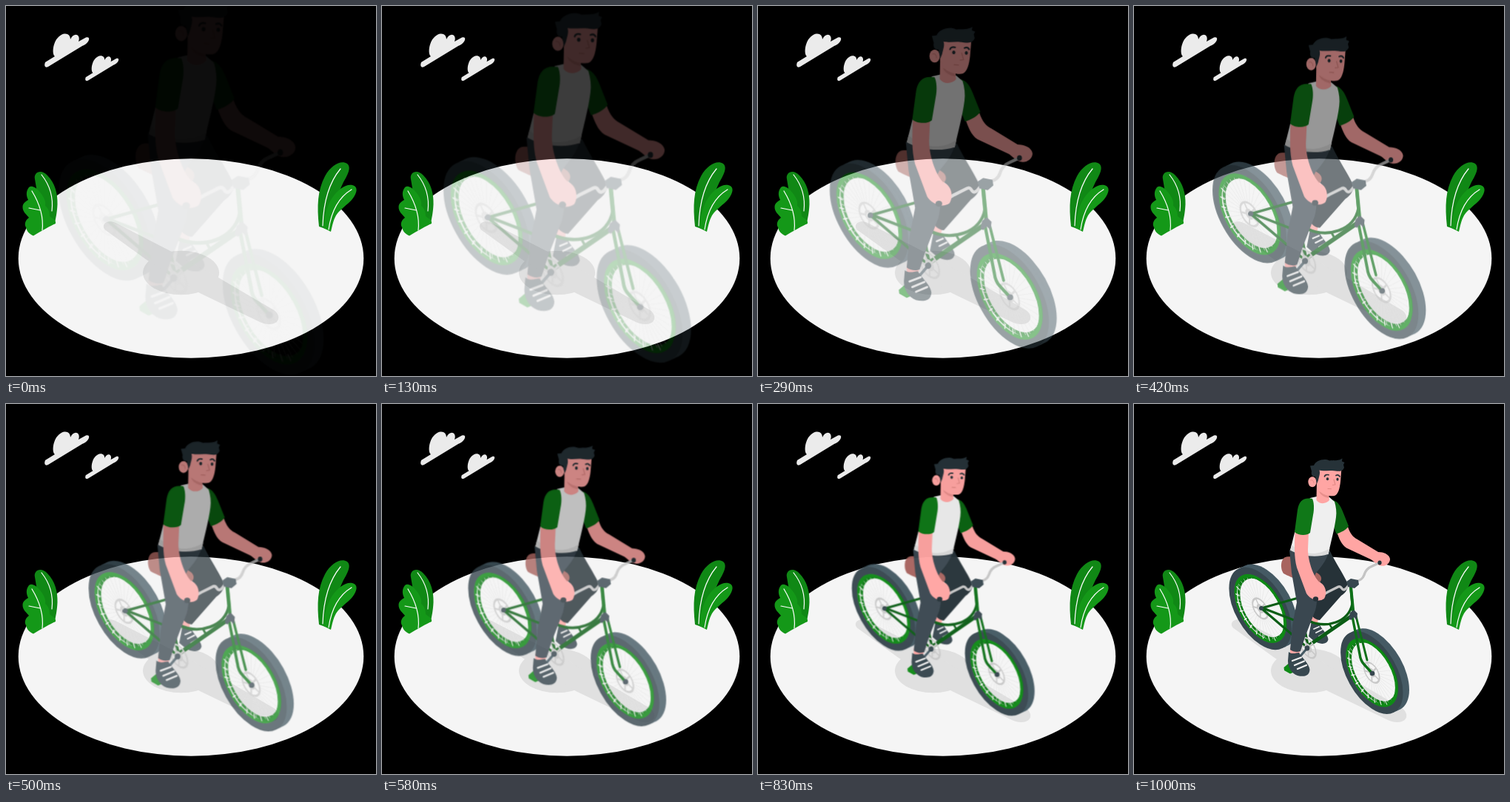
Animation, 500 px wide and 500 px high, one loop 1.04 s. Source, as an HTML page:

```html
<!DOCTYPE html>
<html lang="en">
<head>
<meta charset="utf-8">
<title>Cyclist</title>
<style>
  html, body { margin: 0; width: 100%; height: 100%; overflow: hidden; background: #000; }
  svg { display: block; width: 100vw; height: 100vh; }
  .line { fill: none; stroke-linecap: round; stroke-linejoin: round; }
  .skin { fill: #ffa5a3; }
  .slate { fill: #37474f; }
  .dark { fill: #263238; }
  .leaf { fill: #149818; }
  .leaf-back { fill: #108815; }
  .sleeve { fill: #107818; }
  .sleeve-far { fill: #0c6513; }
  .vein { stroke: #fff; stroke-width: 1.2; }
  .frame { stroke: #0b5d15; }
  .fork { stroke: #0e7018; }
  .metal { stroke: #c4c4c4; }
</style>
</head>
<body>
<svg viewBox="0 0 500 500">
  <defs>
    <path id="cloud" d="M53 76L66 68C63 66 63 58 65 52C68 42 75 38 79 37.5C84 37 87 40 87 45C90 38 96 37 98 41C99 43 99 45 98 48L108 42.5C113 41 113 45 111 48C109 51 106 53 103 54L57 82C53 84 51 81 53 76Z"/>
    <mask id="hole" maskUnits="userSpaceOnUse" x="-70" y="-80" width="150" height="150">
      <rect x="-70" y="-80" width="150" height="150" fill="#fff"/>
      <circle r="40"/>
    </mask>
    <!-- A flat disc seen in the isometric plane of the bike -->
    <g id="wheel" transform="matrix(.866 .56 0 1 0 0)">
      <g mask="url(#hole)" fill="#455a64">
        <circle cx="9.8" cy="-9.5" r="48.7"/>
        <circle cx="4.9" cy="-4.7" r="48.7"/>
      </g>
      <circle class="line" r="44.4" stroke="#37474f" stroke-width="8.600"/>
      <circle class="line" cx="3" cy="-2.600" r="36.400" stroke="#0c7a14" stroke-width="3.800"/>
      <circle class="line" r="38.500" stroke="#0f8a16" stroke-width="4"/>
      <path class="line spokes" stroke="#e4e4e4" stroke-width=".6"/>
      <path class="line ticks" stroke="#f5f5f5" stroke-width="1.300"/>
      <use href="#disc"/>
    </g>
    <g id="disc" class="line" stroke="#c8c8c8">
      <circle r="12" stroke-width="2.200"/>
      <circle r="4" stroke-width="3"/>
      <path class="arms" stroke-width="2"/>
    </g>
  </defs>

  <rect width="500" height="500"/>
  <ellipse cx="250" cy="341" rx="233.300" ry="134.700" fill="#f5f5f5"/>

  <g fill="#ebebeb">
    <use href="#cloud"/>
    <use href="#cloud" transform="translate(68 39.2) scale(.75)"/>
  </g>

  <g>
    <path class="leaf-back" d="M50 300L39 234C37 224 48 220 56 229C66 239 70 253 69.500 268C69 280 67 287 66 294Z"/>
    <path class="leaf" d="M37 310.500C31 308 28 304 27 299C24 294 27 289 31 286C28 282 22 278 22.500 271C23 266 27 264 30 262C27 256 27 250 31 245C36 241 43 248 47 253C51 258 54 264 53 270C58 274 59 279 59 284C63 288 68 289 67 294C60 297 48 304 37 310.500Z"/>
    <path class="line vein" d="M48 228C60 243 64 260 62 277M35 250C46 268 51 285 49 303M31 273L46 276"/>
    <path class="leaf-back" d="M423 298C420 270 421 249 431 230C440 214 453 208 461 213C467 218 462 228 456 238C447 256 442 278 437 303Z"/>
    <path class="leaf" d="M439 305L429 300C430 283 434 269 441 259C449 247 460 240 468 242C476 244 475 252 468 261C461 269 451 275 446 283C442 290 441 297 439 305Z"/>
    <path class="line vein" d="M452 220C437 238 429 265 428 297M467 248C452 257 440 275 436 302"/>
  </g>

  <g fill="#e0e0e0">
    <ellipse cx="236.500" cy="360.500" rx="51.500" ry="29.700"/>
    <path d="M148 293L222 331L287 367L362 411C372 418 370 430 356 430C351 430 347 429 343 427L262 388L190 343L136 304C126 297 136 287 148 293Z"/>
  </g>

  <g id="rider">
    <use href="#wheel" transform="translate(170.600 276.400)"/>

    <!-- Rear frame -->
    <g class="line frame" stroke-width="3">
      <path d="M172 276L222 262M172 276L234 329M172 275L216 292"/>
      <path d="M222 262L235 328" stroke-width="4"/>
    </g>

    <!-- Far leg and saddle -->
    <path class="skin" d="M239 286L249 290L248 296L238 295Z"/>
    <path class="slate" d="M240 293C244 296 248 297 250 296C252 303 262 311 262.500 318C261 326 250 325 243 320L236 314Z"/>
    <path class="line" d="M243 304L250 301M246 309L254 305M250 314L258 309.500" stroke="#f0f0f0" stroke-width="1.800"/>
    <path class="dark" d="M240 196L265 199C272 214 283 230 288 241C291 249 286 255 280 259L251 292C247 292 242 289 240 285L247 262L257 248L240 226Z"/>
    <path d="M206 206.500C198 208 197 222 202 229C213 235 238 245 247 243C254 241 255 234 250 230L218 208C214 206 210 206 206 206.500Z" fill="#a8645f"/>

    <!-- Front frame and wheel -->
    <g class="line frame">
      <path d="M296 285L238 325" stroke-width="5"/>
      <path d="M236 293C260 304 290 295 295 270L293 248" stroke-width="3.400"/>
      <path d="M264 297L268.500 305" stroke-width="2.500"/>
    </g>
    <use href="#wheel" transform="translate(321.300 363)"/>
    <g class="line fork">
      <path d="M293 247L296.500 283" stroke-width="4"/>
      <path d="M300 287L315 346" stroke-width="3"/>
      <path d="M295 287L305 338C306 346 308 349 311 352L322 364" stroke-width="3.400"/>
    </g>
    <path class="slate" d="M292 282L297 278L302 283L301 292L297 288L293 292L290 290Z"/>
    <circle class="slate" cx="322" cy="364" r="3.200"/>
    <circle class="slate" cx="172" cy="276" r="3"/>

    <!-- Crank -->
    <use href="#disc" transform="translate(235.500 329.500) matrix(.866 .56 0 1 0 0)"/>
    <path class="line" d="M234 330L215 352" stroke="#455a64" stroke-width="3"/>
    <circle class="slate" cx="234" cy="330" r="3.400"/>

    <!-- Far arm -->
    <path class="skin" d="M274 173L289 166C292 175 296 180 302 183L330 200C337 200 345 203 346 209.500C346 216 339 220 333 218.500C327 217 324 212 320 210L287 194.500C280 190 277 181 274 173Z"/>
    <path class="sleeve-far" d="M269 130C276 132 279 138 282 145L290 165C287 170 280 173.500 273.500 175.500L266 156Z"/>

    <!-- Torso -->
    <path d="M238 127L247 125L264 126L271 132C273 139 274 146 273 153C271 169 266 187 262.500 203C250 210 225 207 211 198L218 170Z" fill="#efefef"/>
    <path d="M211 198L213 190C226 204 248 206 264.500 195L262.500 203C250 210 225 207 211 198Z" fill="#dcdcdc"/>

    <!-- Head -->
    <path class="skin" d="M247 104L246.500 130C251 136 260 135 264 130L263 119Z"/>
    <path d="M250 118L263 123L263 127C257 126 252 123 250 118Z" fill="#e88f8c"/>
    <ellipse class="skin" cx="241" cy="105.200" rx="5.600" ry="7"/>
    <path class="line" d="M239 103C241 102 243 104 243 107" stroke="#e58b87" stroke-width="1"/>
    <path class="skin" d="M247 87C245 100 246 113 252 119C258 124 267 125 271 124C276 122 278 114 279 105L280.500 86L264 82Z"/>
    <path class="dark" d="M247 108L245 98C241 99 239 95 240 91L238 83.500L243 83C246 76 257 73 264 76.500C270 76 277 77 281.500 73.500L281 77.500L284.500 79L283 82L284 86C281 93 275 90.500 268 90C262 89.500 255 91 250.500 89.500C252 94 250 98 249 103Z"/>
    <path class="line" d="M257.500 98C258 96 260 95 263 95.800M273 96.500C275 95.500 277 96 278 98" stroke="#263238" stroke-width="1.700"/>
    <ellipse class="dark" cx="261.500" cy="101.200" rx="1.700" ry="2"/>
    <ellipse class="dark" cx="275" cy="101.800" rx="1.600" ry="2"/>
    <path class="line" d="M270 102L272 109L268.500 109.500M262 114.500L266.500 114.800" stroke="#e08783" stroke-width="1.100"/>

    <!-- Near leg -->
    <path class="skin" d="M211 329L225 330L223 340L211 339Z"/>
    <path d="M202.500 356L209 350.500L219 358L217 362L211 364.500L203 360Z" fill="#0f8a16"/>
    <path class="slate" d="M209 335C214 339 219 336 223 336C226 342 237 351 237.500 359C237 368 229 369 221 367C213 364 208 356 208 347Z"/>
    <path class="line" d="M214 347L226 342.500M217 353L230 347.500M221 358L233 353" stroke="#f0f0f0" stroke-width="2.200"/>
    <path d="M210 197C225 206 247 208 262 203C259 213 252 221 247 227C243 232 242 238 246 244C248 254 248 268 245 279L231 315L225 334C221 336 215 335 211 332L214 299L220 268L213 228Z" fill="#3a4750"/>

    <!-- Handlebar -->
    <g class="line metal" stroke-width="3.400">
      <path d="M250 261L262 254L276 247C281 245 280 252 284 251C288 250 288 246 292 243"/>
      <path d="M298 240C305 239 309 237 311 231C313 224 317 221 322 219L333 214"/>
    </g>
    <path class="slate" d="M287 240L293 236L303 238L304 244L298 249L289 247Z"/>

    <!-- Near arm -->
    <path class="skin" d="M217.500 173L236 174L235 196C235 214 244 236 251 241C260 245 261 257 257 263C249 269 237 263 233 256L220 221C216 206 217 190 217.500 173Z"/>
    <path class="sleeve" d="M241 128C228 126 223 132 221 143L217 173C222 178 234 178 238 174L242 150C244 141 243 132 241 128Z"/>
    <ellipse class="dark" cx="245.500" cy="263.500" rx="3.600" ry="3.200"/>
    <ellipse class="dark" cx="332" cy="214.500" rx="2.600" ry="3"/>
  </g>
</svg>
<script>
  // Radial lines between two radii, at count angles from a start over a sweep
  function rays(count, inner, outer, start = 0, sweep = 2 * Math.PI) {
    let d = "";
    for (let i = 0; i < count; i++) {
      const a = start + sweep * i / count;
      const at = r => (r * Math.cos(a)).toFixed(2) + " " + (r * Math.sin(a)).toFixed(2);
      d += "M" + at(inner) + "L" + at(outer);
    }
    return d;
  }
  const setPath = (name, d) => document.querySelector(name).setAttribute("d", d);
  setPath(".spokes", rays(32, 12, 36));
  setPath(".ticks", rays(10, 33, 38, 0.9, 2.75));
  setPath(".arms", rays(5, 4, 11, 0.3));

  const LOOP = 1040, FPS = 24, LEAD = 36;
  const rider = document.getElementById("rider");

  // cubic-bezier(0, 0, .58, 1)
  function easeOut(x) {
    if (x >= 1) return 1;
    let lo = 0, hi = 1;
    for (let i = 0; i < 30; i++) {
      const s = (lo + hi) / 2;
      if (1.74 * s * s * (1 - s) + s ** 3 < x) lo = s; else hi = s;
    }
    return 3 * lo * lo - 2 * lo ** 3;
  }

  function draw(now) {
    const t = now % LOOP;
    // The picture holds at 24 steps a second, starting on whole 10 ms
    const step = Math.min(24, Math.floor((t - t % 10 + 5) * FPS / 1000));
    const p = easeOut(step / FPS + LEAD / 1000);
    rider.setAttribute("transform", `translate(250 250) scale(${1.5 - 0.5 * p}) translate(-250 -250)`);
    rider.setAttribute("opacity", p);
    requestAnimationFrame(() => draw(performance.now()));
  }
  draw(performance.now());
</script>
</body>
</html>
```
